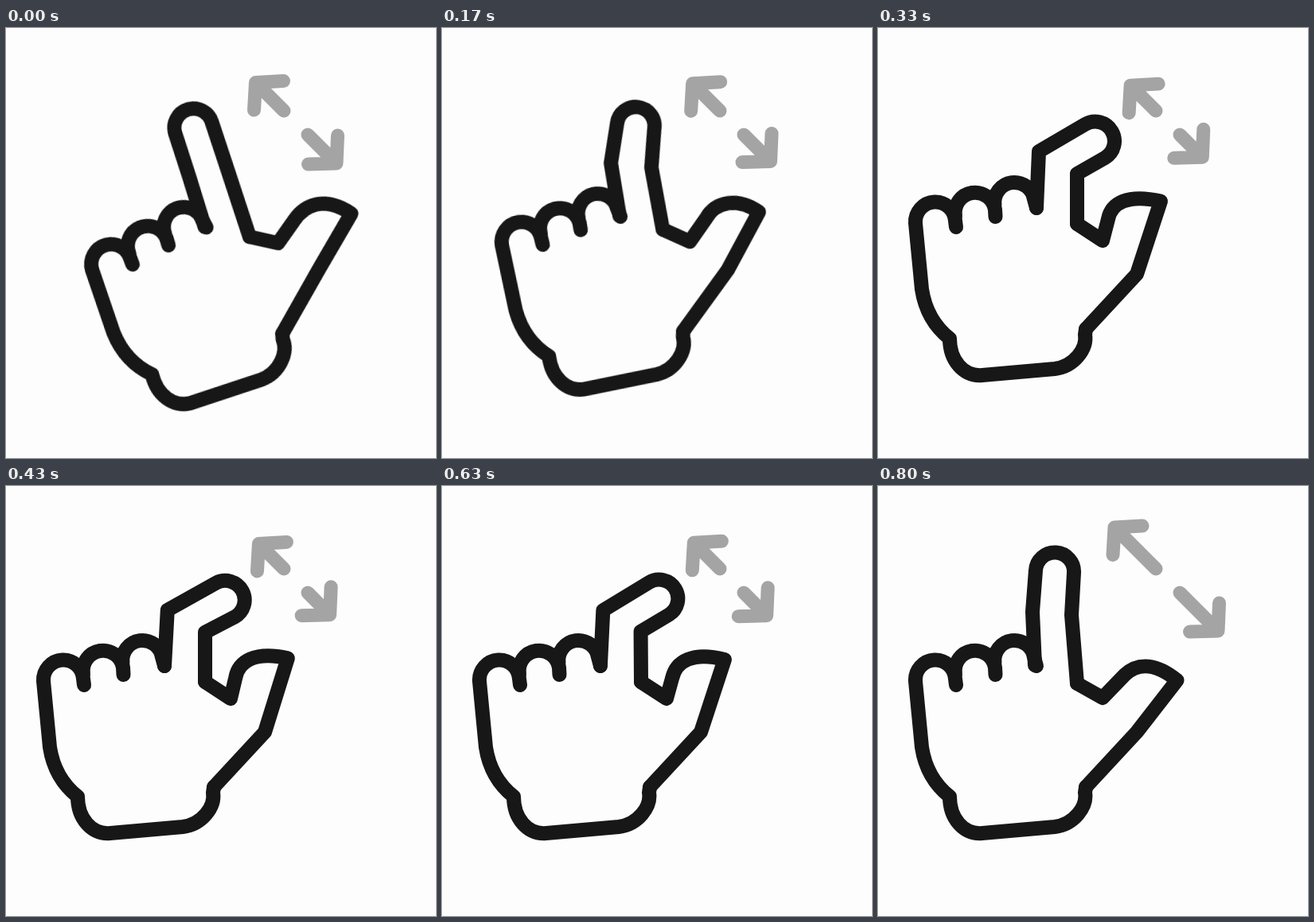
Animation, 540 px wide and 540 px high, one loop 830 ms. Source, as an HTML page without scripts:

```html
<!DOCTYPE html>
<html lang="en">
<head>
<meta charset="utf-8">
<title>Spread gesture</title>
<style>
  html, body { margin: 0; width: 100%; height: 100%; overflow: hidden; background: #fdfdfd; }
  svg { display: block; width: 100vw; height: 100vh; }
  path { fill: none; stroke-linecap: round; stroke-linejoin: round; }

  .hand { stroke: #171717; stroke-width: 18; transform-origin: 261px 378px; animation: move .83s infinite; }
  .finger { animation: finger .83s linear infinite; }
  .thumb { animation: thumb .83s linear infinite; }
  .arrows { stroke: #a4a4a4; stroke-width: 17; animation: arrows .83s infinite; }

  @keyframes move {
    0% { transform: translate(86px, 6px) rotate(-13.3deg); animation-timing-function: cubic-bezier(.78, 0, .26, 1); }
    39.76%, 100% { transform: translate(0px, 0px) rotate(0deg); }
  }

  /* Close quickly with a long settle, then start to open again. */
  @keyframes finger {
    0% {
      d: path("M197 225 L192.5 158 L188 102 A22 22 0 0 1 236 99 L241.5 162 L249 250");
      animation-timing-function: cubic-bezier(.61, 0, .85, .43);
    }
    20.48% { d: path("M198 225 L194.5 158 L207.5 109 A22 22 0 0 1 253.5 120 L244.5 169 L250 248"); }
    27.71% {
      d: path("M199 226 L200 156 L238 115.5 A22 22 0 0 1 272.5 146 L247.5 177.5 L250 248");
      animation-timing-function: cubic-bezier(.22, .4, .45, .76);
    }
    39.76% {
      d: path("M199 226 L202 155 L260 121 A22 22 0 0 1 285 163 L250 183 L250 246");
      animation-timing-function: cubic-bezier(.28, .64, .59, 1);
    }
    63.86% {
      d: path("M199 226 L203 156 L264.5 122 A22 22 0 0 1 287.5 165 L250 184 L250 246");
      animation-timing-function: cubic-bezier(.77, 0, .84, .5);
    }
    87.95% { d: path("M198 225 L197 157 L223.5 113.5 A22 22 0 0 1 264.5 134.5 L246 172 L250 247"); }
    96.39%, 100% { d: path("M197 225 L194 158 L198 106 A22 22 0 0 1 246 109 L243 162 L250 248"); }
  }

  @keyframes thumb {
    0% {
      d: path("M249 250 L282 266 L308 243 C327 225 354 223 380 251 L325 309 L261 378");
      animation-timing-function: cubic-bezier(.61, 0, .85, .43);
    }
    20.48% { d: path("M250 248 L282 267 L306 240 C320 221 348 218 372.5 240 L325 308 L261 378"); }
    27.71% {
      d: path("M250 248 L282 267 L295.5 239 C305 222 327 212 361.5 227.5 L325 309 L261 378");
      animation-timing-function: cubic-bezier(.22, .4, .45, .76);
    }
    39.76% {
      d: path("M250 246 L282 267 L289 240 C293 220 313 208 355 217.5 L325 309 L261 378");
      animation-timing-function: cubic-bezier(.28, .64, .59, 1);
    }
    63.86% {
      d: path("M250 246 L282 267 L288 241 C292 220 312 207 353.5 216 L325 309 L261 378");
      animation-timing-function: cubic-bezier(.77, 0, .84, .5);
    }
    87.95% { d: path("M250 247 L282 266 L298 243 C309 220 336 214 366 233 L325 309 L261 378"); }
    96.39%, 100% { d: path("M250 248 L282 266 L310 237 C327 221 350 223 375.5 244 L325 309 L261 378"); }
  }

  @keyframes arrows {
    0% {
      d: path("M349 104 l-35.5 -35.5 m35 -2 l-35 2 l-2 34.5 M379 134 l36 36 m1.5 -35 l-1.5 35 l-35.5 1");
      animation-timing-function: cubic-bezier(.57, 0, .1, 1);
    }
    63.86% {
      d: path("M349 104 l-31.5 -31.5 m35 -2 l-35 2 l-2 34.5 M379 134 l27.5 27.5 m1.5 -35 l-1.5 35 l-35.5 1");
      animation-timing-function: cubic-bezier(.84, 0, .65, .6);
    }
    96.39%, 100% {
      d: path("M349 104 l-52 -52 m35 -2 l-35 2 l-2 34.5 M379 134 l48 48 m1.5 -35 l-1.5 35 l-35.5 1");
    }
  }
</style>
</head>
<body>
<svg viewBox="0 0 540 540">
  <path class="arrows"/>
  <g class="hand">
    <path d="M98 250 L97 242 A25 25 0 0 0 47 245 L55 328 Q61 367 90 390
      C90 417 107 438 131 436 L222 428 C246 425 263 403 260 385 L261 378"/>
    <path d="M97 236 A25 25 0 0 1 147 228 L147.5 237"/>
    <path d="M146.5 222 A25 25 0 0 1 196 215 L199 226"/>
    <path class="finger"/>
    <path class="thumb"/>
  </g>
</svg>
</body>
</html>
```
